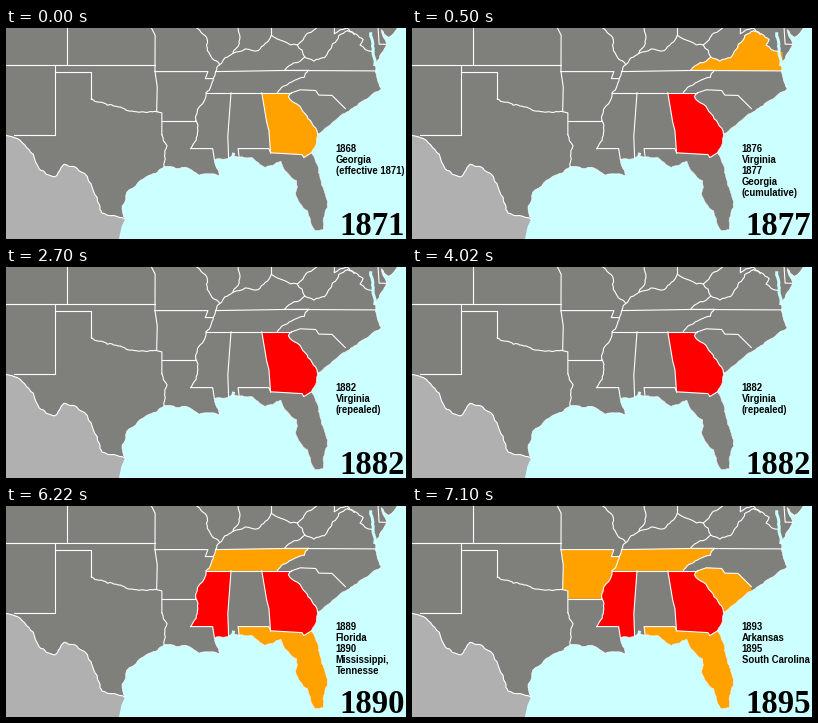
Animation of 400 by 211 pixels, one loop 8 s. Source, as a matplotlib script:

```python
import math
import random

import matplotlib.pyplot as plt
from matplotlib.animation import FuncAnimation

W, H, DPI = 400, 211, 64
STEP, LOOP = 100, 8000
WATER, LAND, ABROAD = "#ccffff", "#7f7f7c", "#b0b0b0"
ORANGE, RED = "#ffa200", "#ff0000"

rng = random.Random(4)
borders = []


def project(*points):
    """Degrees west and north to stage pixels."""
    return [(49.3 + 11.84 * (103.04 - w), 36.6 + 14 * (37 - n)) for w, n in points]


def roughen(a, b, wiggle):
    """Points from a up to b, with midpoints pushed sideways."""
    (x1, y1), (x2, y2) = a, b
    if math.hypot(x2 - x1, y2 - y1) < 4:
        return [a]
    push = rng.uniform(-wiggle, wiggle)
    mid = ((x1 + x2) / 2 + push * (y1 - y2), (y1 + y2) / 2 + push * (x2 - x1))
    return roughen(a, mid, wiggle) + roughen(mid, b, wiggle)


def natural(*points, wiggle=0.13):
    ends = project(*points)
    line = []
    for a, b in zip(ends, ends[1:]):
        line += roughen(a, b, wiggle)
    return line + ends[-1:]


def river(*points):
    borders.append(natural(*points))
    return borders[-1]


def survey(*points):
    borders.append(project(*points))
    return borders[-1]


coast = natural(
    (74.0, 40), (74.1, 39.7), (74.9, 38.95), (75.5, 39.5), (75.05, 38.5),
    (75.95, 37.1), (76.0, 36.9), (75.5, 35.25), (76.55, 34.65), (77.9, 33.9),
    (79.2, 33.15), (80.9, 32.05), (81.4, 30.7), (80.55, 28.4), (80.05, 26.8),
    (80.4, 25.2), (81.1, 25.13), (82.75, 27.8), (82.65, 28.7), (84.0, 30.1),
    (85.3, 29.65), (86.5, 30.38), (89.6, 30.2), (89.15, 29.05), (90.9, 29.1),
    (91.8, 29.6), (93.85, 29.7), (95.1, 29.1), (97.0, 27.9), (97.4, 26.9),
    (97.15, 25.96), wiggle=0.1)
bays = [natural((76.05, 37.0), (76.2, 38.0), (76.4, 39.2)),
        natural((88.0, 30.2), (88.0, 30.6))]

# Rivers and ridges
rio_grande = river(
    (97.15, 25.96), (99.1, 26.4), (99.5, 27.5), (100.9, 29.35), (102.3, 29.88),
    (103.1, 28.98), (104.4, 29.55), (104.9, 30.6), (106.5, 31.78), (108, 31.78))
savannah = river((83.1, 34.98), (83.35, 34.7), (81.95, 33.5), (80.9, 32.05))
river_la = river((91.6, 31), (91.0, 32.3), (91.17, 33))
river_ar = river((91.17, 33), (90.3, 34.98))
river_tn = river((90.3, 34.98), (89.7, 36), (89.5, 36.5))
tn_east = river((81.68, 36.59), (82, 36.1), (83.1, 35.75), (84.3, 34.98))
va_west = river((83.68, 36.58), (81.97, 37.54), (81.2, 37.25), (80.3, 37.5),
                (79.6, 38.5), (78.35, 39.42))
potomac = river((78.35, 39.42), (77.04, 38.8), (77.3, 38.4), (76.3, 37.95))
river((100, 34.56), (97.2, 33.85), (94.48, 33.64))
river((94.04, 31.99), (93.6, 31.2), (93.85, 29.7))
river((89.5, 36.5), (89.15, 37), (90.2, 38), (90.2, 38.75), (91.4, 39.75))
river((89.15, 37), (88.05, 37.8), (85.9, 38), (84.8, 39.1), (83.7, 38.65),
      (82.6, 38.4), (81.7, 39.25), (80.85, 39.75))
river((82.6, 38.4), (81.97, 37.54))
river((88.05, 37.8), (87.5, 38.5), (87.53, 39.75))
river((77.8, 39.15), (78.4, 39.62), (79.48, 39.2), (79.48, 39.75))

# Surveyed borders
ga_west = survey((85.6, 34.98), (85.18, 32.87), (85, 32.3), (84.86, 30.7))
ga_south = survey((84.86, 30.7), (82.2, 30.57), (82.05, 30.36), (81.4, 30.7))
sc_north = survey((83.1, 34.98), (82.35, 35.2), (81.05, 35.15), (80.78, 34.82),
                  (79.67, 34.8), (78.55, 33.86))
fl_north = survey((87.5, 30.28), (87.6, 31), (85, 31), (84.86, 30.7))
ms_east = survey((88.2, 34.98), (88.47, 31.9), (88.4, 30.3))
ms_south = survey((89.6, 30.2), (89.75, 31), (91.6, 31))
tn_north = survey((89.5, 36.5), (83.68, 36.58), (81.68, 36.59))
va_south = survey((83.68, 36.58), (75.9, 36.55))
ar_north = survey((94.62, 36.5), (90.15, 36.5), (90.37, 36), (89.7, 36))
ar_west = survey((94.62, 36.5), (94.43, 35.4), (94.48, 33.64), (94.04, 33.55),
                 (94.04, 31.99))
survey((90.3, 34.98), (83.1, 34.98))
survey((94.04, 33), (91.17, 33))
survey((108, 37), (94.62, 37))
survey((102.05, 40), (102.05, 37))
survey((103.04, 37), (103.04, 32), (106.5, 32))
survey((103.04, 36.5), (100, 36.5), (100, 34.56))
survey((95, 39.75), (94.61, 39.1), (94.62, 36.5))
survey((84.82, 39.1), (84.82, 39.75))
survey((75.79, 39.75), (75.69, 38.46), (75.05, 38.45))

# Coastal states reach out to sea and are clipped to the land
outlines = {
    "GA": ga_west + ga_south + project((80, 30.7), (80, 32.05)) + savannah[::-1],
    "VA": va_west + potomac + project((75.9, 37.9)) + va_south[::-1],
    "FL": fl_north + ga_south + project((79, 30.7), (79, 24.5), (87.5, 24.5)),
    "MS": ms_east + project((88.4, 30), (89.6, 30)) + ms_south + river_la + river_ar,
    "TN": river_tn + tn_north + tn_east,
    "AR": ar_north + river_tn[::-1] + river_ar[::-1] + project((94.04, 33))
          + ar_west[-2::-1],
    "SC": sc_north + project((78.5, 32)) + savannah[::-1],
}

later = {"GA": RED, "MS": RED, "TN": ORANGE, "FL": ORANGE}
scenes = [  # start in ms, year, label, fills
    (0, "1871", "1868 Georgia (effective~1871)", {"GA": ORANGE}),
    (500, "1877", "1876 Virginia 1877 Georgia (cumulative)",
     {"GA": RED, "VA": ORANGE}),
    (2700, "1882", "1882 Virginia (repealed)", {"GA": RED}),
    (4900, "1890", "1889 Florida 1890 Mississippi, Tennesse", later),
    (7100, "1895", "1893 Arkansas 1895 South~Carolina",
     {**later, "AR": ORANGE, "SC": ORANGE}),
]

fig = plt.figure(figsize=(W / DPI, H / DPI), dpi=DPI, facecolor=WATER)
ax = fig.add_axes([0, 0, 1, 1])
ax.set(xlim=(0, W), ylim=(H, 0))
ax.axis("off")


def px(size):
    return size * 72 / DPI


def area(points, color, z):
    return ax.add_patch(plt.Polygon(points, fc=color, ec="none", zorder=z))


def stroke(points, width, color="white", z=5):
    ax.plot(*zip(*points), color=color, lw=px(width), zorder=z,
            solid_joinstyle="round")


gulf = project((97.15, 25.96), (97.45, 25.4), (97.7, 24.4))
area(rio_grande[::-1] + gulf + project((108, 24.4)), ABROAD, 1)
land = area(coast + rio_grande + project((108, 40)), LAND, 2)
states = {name: area(shape, LAND, 3) for name, shape in outlines.items()}
for patch in states.values():
    patch.set_clip_path(land)
for bay in bays:
    stroke(bay, 3, WATER, 4)
for line in borders:
    stroke(line, 1.1)
stroke(coast, 0.6)

year = ax.text(333.3, 207.3, "", family="Liberation Serif", weight="bold",
               size=px(32.7), va="baseline", zorder=6)
lines = [ax.text(329.6, 124.3 + 11 * i, "", family="Liberation Sans",
                 weight="bold", size=px(9.5), va="baseline", zorder=6)
         for i in range(5)]


def draw(i):
    _, number, label, fills = [s for s in scenes if s[0] <= i * STEP][-1]
    year.set_text(number)
    words = label.split(" ")
    for k, text in enumerate(lines):
        text.set_text(words[k].replace("~", " ") if k < len(words) else "")
    for name, patch in states.items():
        patch.set_facecolor(fills.get(name, LAND))
    return [year, *lines, *states.values()]


anim = FuncAnimation(fig, draw, frames=LOOP // STEP, interval=STEP,
                     repeat=True, repeat_delay=0, blit=False)
plt.show()
```
